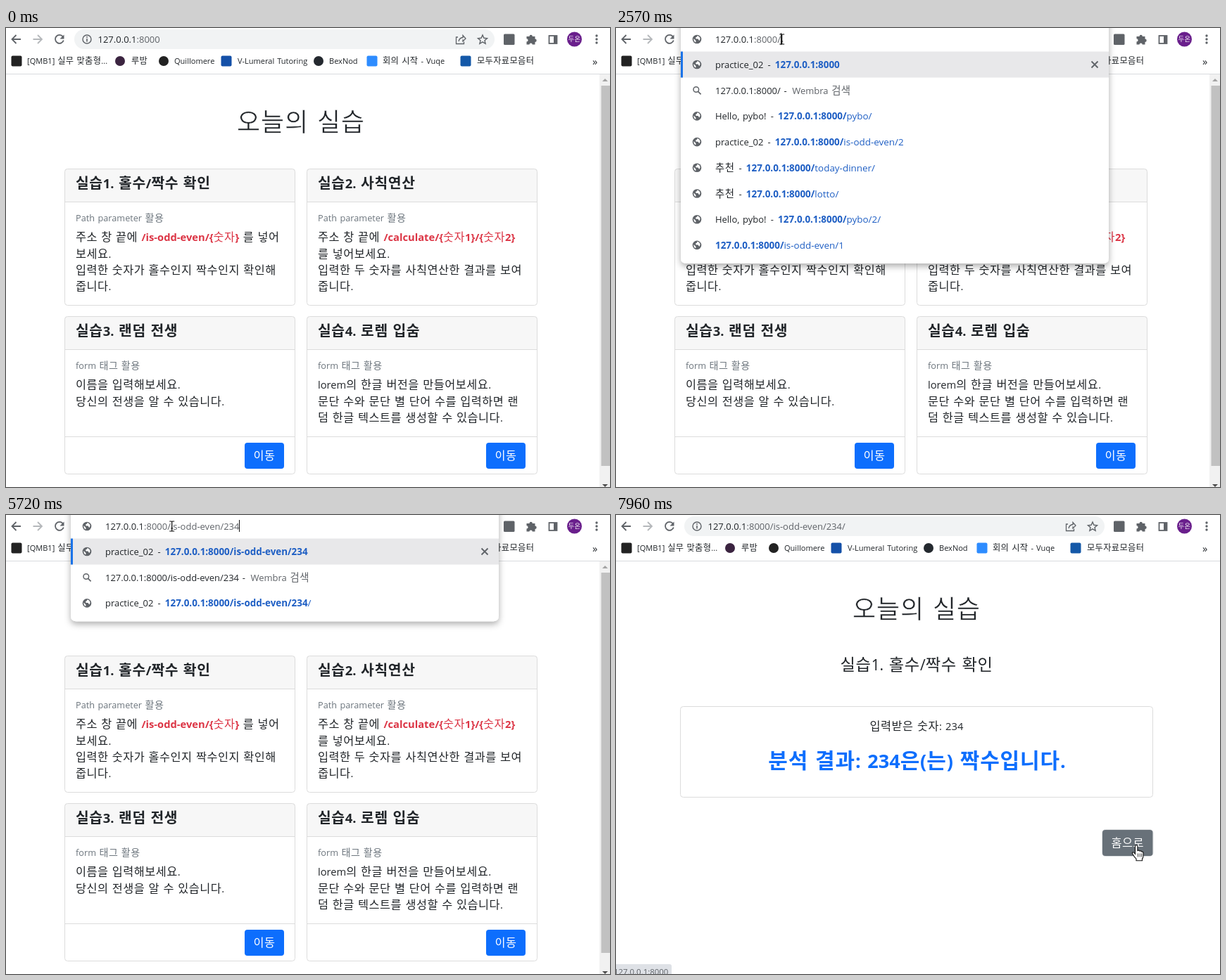
An HTML page for the animation above (8 s loop, 858 by 653 pixels).

```html
<!DOCTYPE html>
<html lang="ko">
<head>
<meta charset="utf-8">
<title>오늘의 실습</title>
<style>
html, body { margin: 0; width: 100%; height: 100%; overflow: hidden; background: #fff; }
svg { display: block; }
text { font-family: "Open Sans", "Noto Sans CJK KR", "Noto Sans CJK", sans-serif; white-space: pre; }
.ko { font-size: 1.02em; letter-spacing: .03em; }
.la { font-size: .92em; word-spacing: .1em; }
.path { font-weight: 700; }
.path .ko { font-weight: 500; }
.thin { font-weight: 300; stroke: #fff; stroke-width: .6px; }
</style>
</head>
<body>
<svg id="stage" width="858" height="653" viewBox="0 0 858 653"></svg>
<script>
const LOOP = 8000;
const INK = '#212529', GREY = '#5f6368', BLUE = '#0d6efd', LINK = '#1f5fc4';
const HOST = '127.0.0.1', BASE = HOST + ':8000';

// Markup helpers
const runs = s => s.replace(/[가-힣]+|[^가-힣]+/g,
  r => `<tspan class="${/[가-힣]/.test(r) ? 'ko' : 'la'}">${r}</tspan>`);
const span = (s, attrs) => `<tspan ${attrs}>${runs(s)}</tspan>`;
const rich = (x, cy, size, inner, attrs = '') =>
  `<text x="${x}" y="${cy + size * .36}" font-size="${size}" fill="${INK}" ${attrs}>${inner}</text>`;
const label = (x, cy, size, s, attrs) => rich(x, cy, size, runs(s), attrs);
const rect = (x, y, w, h, fill, attrs = '') =>
  `<rect x="${x}" y="${y}" width="${w}" height="${h}" fill="${fill}" ${attrs}/>`;
const dot = (x, y, r, fill, attrs = '') => `<circle cx="${x}" cy="${y}" r="${r}" fill="${fill}" ${attrs}/>`;
const line = (d, color = GREY, width = 1.8) =>
  `<path d="${d}" fill="none" stroke="${color}" stroke-width="${width}"/>`;
const group = (id, inner) => `<g id="${id}">${inner}</g>`;
const MID = 'text-anchor="middle"';

const globe = (x, y) => dot(x, y, 6.3, GREY) +
  `<path d="M${x - 4.6} ${y - 1}l3 3v2.4q-3.4-1-3-5.4zM${x} ${y - 4.8}q4 0 4.6 4.4l-1.4 2.6-1.6-2.6h-3l-.6-2 2-1z" fill="#fff"/>`;
const lens = (x, y) => dot(x - 1.2, y - 1.2, 3.8, 'none', `stroke="${GREY}" stroke-width="1.5"`) +
  line(`M${x + 1.6} ${y + 1.6}l4 4`, GREY, 1.7);
const cross = (x, y, r) => line(`M${x - r} ${y - r}l${2 * r} ${2 * r}m0 ${-2 * r}l${-2 * r} ${2 * r}`);

function toolbar() {
  const marks = [
    [15, 30, '#222', '[QMB1] 실무 맞춤형...', 1], [162, 178, '#3b2440', '루밤', 0],
    [224, 239, '#222', 'Quillomere', 0], [313, 329, '#1450a8', 'V-Lumeral Tutoring', 1],
    [444, 459, '#24292f', 'BexNod', 0], [520, 535, '#2d8cff', '회의 시작 - Vuqe', 1],
    [653, 669, '#1458a8', '모두자료모음터', 1]
  ];
  return rect(0, 0, 858, 65, '#fff') + rect(0, 65, 858, 1, '#d9dbde') +
    line('M21 16H8.500m6-6l-6 6 6 6') + line('M38.500 16H51m-6-6l6 6-6 6', '#b5b8bb') +
    group('reload', line('M80.800 12.200a6 6 0 1 0 1 5.300') + `<path d="M82.500 9.500v6h-6z" fill="${GREY}"/>`) +
    group('stop', cross(76, 16, 5)) +
    rect(707, 8.5, 15.5, 15.5, GREY, 'rx="1.500"') +
    `<path d="M739.500 12h4a2.200 2.200 0 1 1 4.400 0h3.600v3.600a2.200 2.200 0 1 1 0 4.400v3.500h-3.800a2.100 2.100 0 1 0-4.200 0h-4v-4a2.100 2.100 0 1 0 0-4.200z" fill="${GREY}"/>` +
    rect(771.5, 11, 11, 11, 'none', `stroke="${GREY}" stroke-width="1.800"`) + rect(778, 11, 5, 11, GREY) +
    dot(807.5, 16, 10.5, '#6a1f8c') + label(807.5, 16, 9, '두온', `${MID} style="fill:#fff"`) +
    [11, 16, 21].map(y => dot(839, y, 1.7, GREY)).join('') +
    marks.map(([ix, x, color, name, square]) =>
      (square ? rect(ix - 7.5, 39.5, 15, 15, color, 'rx="2"') : dot(ix, 47, 7, color)) +
      label(x, 47, 12, name)).join('') +
    label(833, 47, 16, '»');
}

function omnibox() {
  return rect(97, 2, 597, 28, '#f1f3f4', 'rx="14" id="pill"') + dot(115, 16, 6, 'none', `stroke="${GREY}" stroke-width="1.400"`) +
    rect(114.2, 15, 1.6, 4.5, GREY) + rect(114.2, 12, 1.6, 1.7, GREY) +
    line('M642 13h-2.500v9.500h11v-3M643 19q1-5 6-5.500v-3l4 4.500-4 4v-2.700', GREY, 1.3) +
    line('M677 10l1.900 4.300 4.600.4-3.500 3 1.100 4.600-4.100-2.500-4.100 2.500 1.100-4.600-3.500-3 4.600-.4z', GREY, 1.4);
}

function scrollbar() {
  return rect(843, 66, 15, 587, '#f1f1f1') + rect(845.5, 82, 12.5, 541, '#c1c1c1') +
    '<path d="M847 76h8l-4-4z" fill="#a3a3a3"/><path d="M847 649h8l-4 4z" fill="#505050"/>';
}

const frame = (x, y, w, h) => rect(x + .5, y + .5, w - 1, h - 1, 'none', 'rx="4" stroke="#dcdcdc"');

function card(x, y, h, title, sub, lines, buttonX) {
  return rect(x, y, 328, 48, '#f7f7f7', 'rx="4"') + rect(x, y + 47, 328, 1, '#dcdcdc') +
    label(x + 16, y + 20.5, 20, title, 'font-weight="700"') +
    label(x + 16, y + 70.5, 13.8, sub, 'style="fill:#6c757d"') +
    lines.map((s, i) => rich(x + 16, y + 97.5 + i * 23.3, 16, s.split('*').map((part, k) =>
      k % 2 ? span(part, 'class="path" fill="#dc3545"') : runs(part)).join(''))).join('') +
    (buttonX ? rect(x, y + 171, 328, 1, '#dcdcdc') + rect(buttonX, y + 180, 56, 37, BLUE, 'rx="4"') +
      label(buttonX + 28, y + 198, 16, '이동', `${MID} style="fill:#fff"`) : '') +
    frame(x, y, 328, h);
}

const heading = x => label(x, 134, 35.2, '오늘의 실습', `${MID} class="thin"`);

function homePage() {
  return rect(0, 66, 858, 587, '#fff') + heading(419) +
    card(83, 200, 195, '실습1. 홀수/짝수 확인', 'Path parameter 활용',
      ['주소 창 끝에 */is-odd-even/{숫자}* 를 넣어', '보세요.', '입력한 숫자가 홀수인지 짝수인지 확인해', '줍니다.']) +
    card(427, 200, 195, '실습2. 사칙연산', 'Path parameter 활용',
      ['주소 창 끝에 */calculate/{숫자1}/{숫자2}*', '를 넣어보세요.', '입력한 두 숫자를 사칙연산한 결과를 보여', '줍니다.']) +
    card(83, 410, 225, '실습3. 랜덤 전생', 'form 태그 활용',
      ['이름을 입력해보세요.', '당신의 전생을 알 수 있습니다.'], 339) +
    card(427, 410, 225, '실습4. 로렘 입숨', 'form 태그 활용',
      ['lorem의 한글 버전을 만들어보세요.', '문단 수와 문단 별 단어 수를 입력하면 랜', '덤 한글 텍스트를 생성할 수 있습니다.'], 682) +
    scrollbar();
}

function resultPage() {
  return rect(0, 66, 858, 587, '#fff') + heading(427) +
    label(427, 213, 22.8, '실습1. 홀수/짝수 확인', MID) + frame(91, 272, 672, 130) +
    label(427, 300, 16, '입력받은 숫자: 234', MID) +
    label(427.5, 349, 29.4, '분석 결과: 234은(는) 짝수입니다.', `${MID} font-weight="700" style="fill:${BLUE}"`) +
    rect(690.5, 447.5, 72.5, 38, 'none', 'rx="5" stroke="#dfe1e3" id="ring"') +
    rect(691, 448, 71.5, 37, '#6c757d', 'rx="4" id="home"') +
    label(726.7, 466.5, 16, '홈으로', `${MID} style="fill:#fff"`) +
    group('status', rect(-4, 639, 83, 20, '#dee1e6', 'rx="3"') + label(-3, 650, 12.4, BASE, `style="fill:${GREY}"`));
}

// Suggestions: "title|path after the host"; an empty title shows the address alone
const ODD = '/is-odd-even/';
const odd = (...tails) => tails.map(n => `practice_02|${ODD}${n}`);
const oddList = [...odd('2'), '?', ...odd('234', '2/'), `|${ODD}1`, `practice_02|${ODD}3`];
const twoList = [...odd('2'), '?', ...odd('234', '2/')];
const typing = [
  [2500, '/', '', ['practice_02|', '?', 'Hello, pybo!|/pybo/', `practice_02|${ODD}2`, '추천|/today-dinner/',
    '추천|/lotto/', 'Hello, pybo!|/pybo/2/', `|${ODD}1`]],
  [2900, '/i', 's-odd-even/2', oddList],
  [3040, '/is', '-odd-even/2', oddList],
  [3760, ODD + '2', '', twoList],
  [4500, ODD, '', [...oddList, `practice_02|${ODD}1/`]],
  [4900, ODD + '2', '', twoList],
  [5430, ODD + '23', '4', [...odd('234'), '?', ...odd('234/', '23')]],
  [5720, ODD + '234', '', [...odd('234'), '?', ...odd('234/')]]
];

function suggestions(typed, rows) {
  const bottom = 41 + 36.75 * rows.length;
  const row = (entry, i) => {
    const y = 52 + 36.7 * i;
    if (entry === '?') return lens(115, y) + rich(141, y, 14.1, runs(BASE + typed + ' -') +
      span(' Wembra 검색', `dx="3" fill="${GREY}"`));
    const [title, path] = entry.split('|');
    let n = 0;
    while (n < path.length && path[n] === typed[n]) n++;
    return globe(115, y) + rich(141, y, 14.1, (title ? runs(title) + span(' - ', 'dx="1.500"') : '') +
      span(BASE + path.slice(0, n), `dx="${title ? 1.5 : 0}" font-weight="700" font-size="14.600" fill="${LINK}"`) +
      (n < path.length ? span(path.slice(n), `font-size="14.600" fill="${LINK}"`) : ''));
  };
  return `<path d="M92-20H700V${bottom - 8}q0 8-8 8H100q-8 0-8-8z" fill="#fff" filter="url(#shade)"/>` +
    rect(92, 33.5, 608, 37, '#e8e8ea') + rect(92, 33.5, 3, 37, '#1a73e8') + cross(680, 52, 4.5) +
    rows.map(row).join('');
}

const stage = document.getElementById('stage');
stage.innerHTML =
  `<defs><filter id="shade" x="-10%" y="-20%" width="120%" height="150%">
    <feDropShadow dx="0" dy="4" stdDeviation="5" flood-color="#000" flood-opacity=".32"/></filter></defs>` +
  rect(0, 0, 858, 653, '#fff') + group('homePage', homePage()) + group('resultPage', resultPage()) +
  group('bar', toolbar()) + group('omni', omnibox()) + group('drop', '') + group('dropIcon', globe(115, 16)) +
  dot(231, 15, 11.5, '#fdf06a', 'id="halo"') + rect(0, 6, 0, 20, '#99c1f1', 'id="sel"') +
  `<text id="url" y="20.700" font-size="13" fill="${INK}"></text>` + rect(0, 7, 1, 17, '#111', 'id="caret"') +
  group('beam', line('M-3.500-7h2.500q1 0 1 1V6q0 1-1 1h-2.500M3.500-7H1q-1 0-1 1V6q0 1 1 1h2.500M-1.500 3h3', '#111', 1.2)) +
  group('arrow', '<path d="M0 0v16.500l3.800-3.600 2.500 5.800 2.500-1-2.500-5.700h5.300z" fill="#fff" stroke="#111"/>') +
  group('hand', '<path d="M-2 1.500q0-1.700 1.700-1.700t1.700 1.700v6q2.200-1 2.900.6 2.200-.8 2.700.8 2.500-.4 2.500 2v4.600q0 2-1.500 3.500v2.800h-8.500v-2.600q-2.500-2.200-5.300-7.200-.8-2.200 1-2.300 1 0 2.800 2.600z" fill="#fff" stroke="#111" stroke-width="1.100"/>' +
    line('M2 11.500v5M4.700 11.500v5M7.200 11.500v5', '#111', .8));

const el = Object.fromEntries([...stage.querySelectorAll('[id]')].map(e => [e.id, e]));
const show = (id, on) => { el[id].style.display = on ? '' : 'none'; };
const set = (id, attrs) => { for (const k in attrs) el[id].setAttribute(k, attrs[k]); };
const clamp = v => Math.min(1, Math.max(0, v));
const ease = v => v * v * (3 - 2 * v);
const between = (t, a, b) => t >= a && t < b;

function pointer(t) {
  const glide = (a, b, from, to) => {
    const k = ease(clamp((t - a) / (b - a)));
    return from.map((v, i) => v + (to[i] - v) * k);
  };
  if (t < 830) return glide(70, 760, [790, 631], [233, 16]);
  if (t < 6740) return [t < 1480 ? 233 : t < 2030 ? 234 : 235.7, 16];
  return t < 7500 ? glide(6690, 7480, [236, 16], [738, 491]) : glide(7500, 7800, [738, 491], [739.5, 470]);
}

let shownUrl, shownDrop;

function render(t) {
  const step = t < 6120 ? typing.filter(s => t >= s[0]).pop() : null;
  const open = t >= 2500 && t < 6190;
  const fading = t >= 6120;
  const loaded = t >= 6260;

  show('homePage', !loaded);
  show('resultPage', loaded);
  show('stop', between(t, 6120, 6330));
  show('reload', !between(t, 6120, 6330));
  show('dropIcon', !!step);
  const focused = between(t, 780, 2500);
  set('pill', { fill: focused ? '#fff' : '#f1f3f4', stroke: focused ? '#1a73e8' : 'none', 'stroke-width': 2 });

  // Suggestion list, fading out after Enter
  const list = open ? step || typing[typing.length - 1] : null;
  if (list !== shownDrop) {
    el.drop.innerHTML = list ? suggestions(list[1], list[3]) : '';
    shownDrop = list;
  }
  set('drop', { opacity: fading ? .1 : 1 });

  // Address text, selection and caret
  const tail = step ? step[1] + step[2] : t < 2500 ? '' : loaded ? ODD + '234/' : ODD + '234';
  const x = step ? 141 : 130.5;
  if (tail !== shownUrl) {
    el.url.innerHTML = `${HOST}<tspan fill="${GREY}">:8000${tail}</tspan>`;
    shownUrl = tail;
  }
  set('url', { x });
  const widthTo = n => n ? el.url.getSubStringLength(0, n) : 0;
  const length = BASE.length + tail.length;
  const selectFrom = between(t, 780, 1150) ? 0 : between(t, 1150, 1680) ? HOST.length + 1 :
    step && step[2] ? length - step[2].length : length;
  const left = widthTo(selectFrom), right = widthTo(length);
  set('sel', { x: x + left, width: Math.max(0, right - left) });
  const caretStart = step ? step[0] : 1680;
  show('caret', between(t, 1680, 6120) && selectFrom === length && Math.floor((t - caretStart) / 535) % 2 === 0);
  set('caret', { x: Math.round(x + right) });

  // Pointer
  const [px, py] = pointer(t);
  const inBar = py < 31 && px > 97 && px < 694;
  const onButton = t >= 7540;
  show('beam', t >= 70 && inBar);
  show('arrow', t >= 70 && !inBar && !onButton);
  show('hand', onButton);
  for (const id of ['beam', 'arrow', 'hand']) set(id, { transform: `translate(${px} ${py})` });
  show('halo', between(t, 760, 830) || between(t, 1150, 1280) || between(t, 1680, 1750));

  set('home', { fill: onButton ? '#687179' : '#6c757d' });
  show('ring', t >= 7900);
  set('status', { opacity: clamp((t - 7600) / 200) });
}

const start = performance.now();
function tick() {
  render((performance.now() - start) % LOOP);
  requestAnimationFrame(tick);
}
tick();
</script>
</body>
</html>
```
